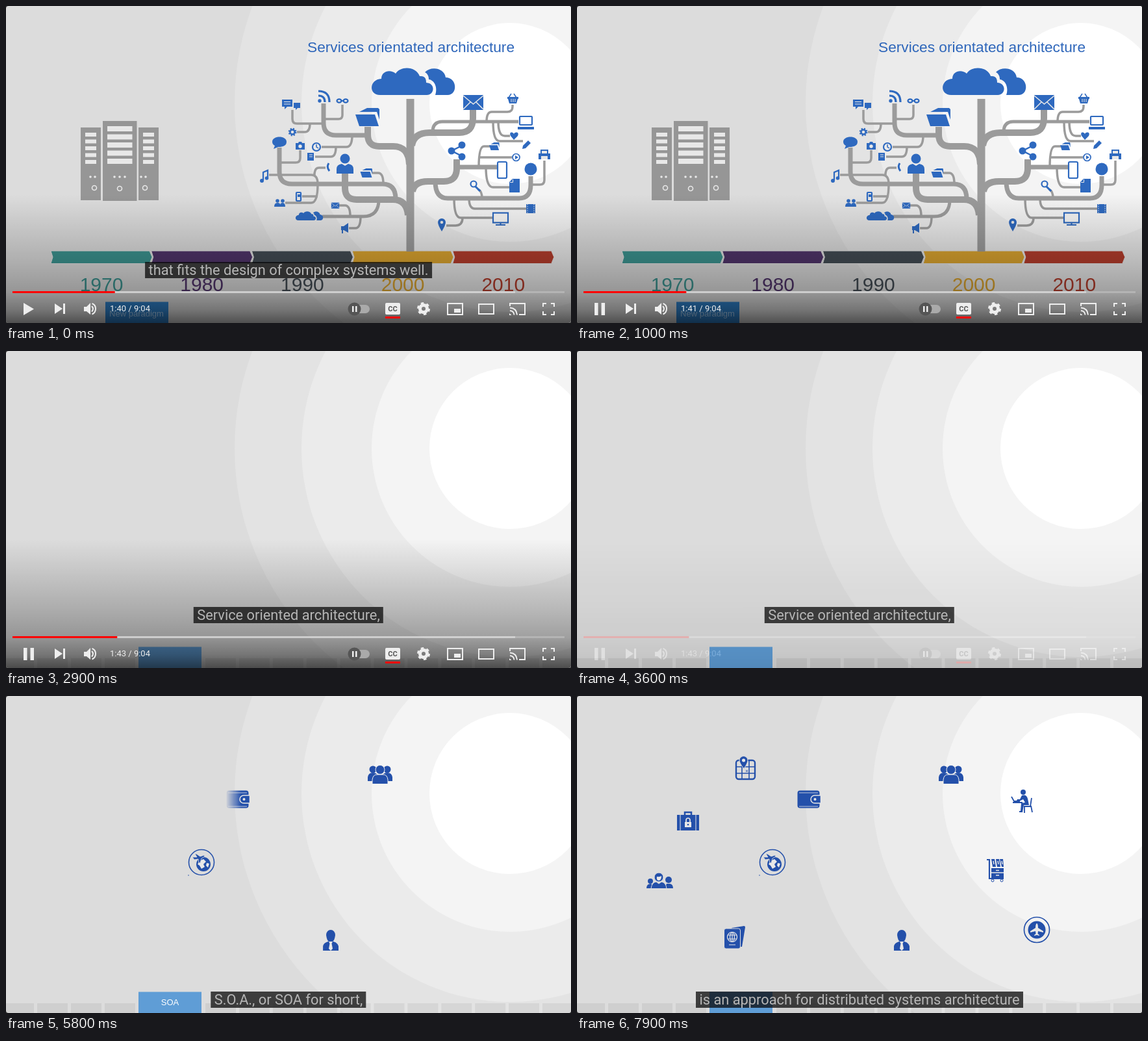
Recreate the animation shown at these times as an HTML page. Size 870 by 488 pixels, loop 8 s.

```html
<!DOCTYPE html>
<html lang="en">
<head>
<meta charset="utf-8">
<title>Services orientated architecture</title>
<style>
html, body { margin: 0; width: 100%; height: 100%; overflow: hidden; background: #333; }
#stage { position: relative; width: 870px; height: 488px; overflow: hidden; border-radius: 4px; background: #dcdcdc; }
#stage > svg { position: absolute; left: 0; top: 0; }
#stage > .icon {
  width: 48px; height: 48px; fill: #2450aa; stroke: none;
  mask-image: linear-gradient(to left, #000 calc(var(--p) * 150% - 50%), transparent calc(var(--p) * 150%));
}
.line { fill: none; stroke: #2450aa; }
.pale { fill: #e8e8e8; }
.paleline { fill: none; stroke: #e8e8e8; }
.sans { font-family: "Liberation Sans", Arial, sans-serif; }
#caption {
  position: absolute; left: 435px; transform: translateX(-50%); height: 25px; padding: 0 5.5px;
  font: 21.8px/25px Roboto, sans-serif; white-space: nowrap; color: #b6b6b6; background: rgba(8,8,8,.75);
}
</style>
</head>
<body>
<div id="stage">
<svg id="back" width="870" height="488">
  <circle cx="776" cy="150" r="424" fill="#e3e3e3"/>
  <circle cx="776" cy="150" r="321" fill="#ebebeb"/>
  <circle cx="776" cy="150" r="213" fill="#f4f4f4"/>
  <circle cx="776" cy="150" r="124" fill="#fff"/>

  <g id="scene">
    <text x="464" y="71" class="sans" font-size="22.7" fill="#2e66ba">Services orientated architecture</text>
    <g id="servers" fill="#969696"></g>
    <g id="years" class="sans" font-size="30" text-anchor="middle"></g>

    <g fill="none" stroke="#9b9b9b">
      <path stroke-width="12" d="M622.500 143V378"/>
      <path stroke-width="10" d="M557 186V198Q557 216 575 216H596Q620 216 621 244M522 258V280Q522 298 540 298H596Q617 298 619 322M719 160V173Q719 195 698 195H652Q628 195 625 215M694 236V250Q694 270 674 270H650Q628 270 626 286"/>
      <path stroke-width="7" d="M489 150V180Q489 199 508 199H556M421 218V255Q421 274 440 274H580Q600 274 600 297M694 248H756M808 262V275Q808 296 790 296H680Q661 296 661 270"/>
      <path stroke-width="5" d="M487 324H550Q574 324 574 298M789 178H672Q657 178 657 194"/>
      <path stroke-width="3.500" d="M441 160V174Q441 181 448 181H489M518 152V168Q518 174 512 174H489M448 194H460Q468 194 468 181
        M453 222V234Q453 241 446 241H421M486 217H524Q533 217 533 199M476 232H500Q508 232 508 217M492 249H482Q475 249 475 260
        M405 260H470Q480 260 480 274M564 257H573Q581 257 581 274M430 303H470Q480 303 480 274M456 293H480M513 307H522Q530 307 530 324
        M528 342H538Q546 342 546 324M780 152V155Q780 163 772 163H748Q740 163 740 178M776 200H768Q758 200 758 178
        M796 208H760Q750 208 750 178M745 216H736Q728 216 728 248M779 233H728M776 279H750Q739 279 739 248
        M829 238V268Q829 275 822 275H808M727 282Q733 285 733 296M801 312H722Q713 312 713 296M749 326H700Q690 326 690 296M678 338H692Q703 338 703 326"/>
    </g>

    <g fill="#2e69bf" stroke="none">
      <g id="clouds">
        <path d="M576 137C558 137 559 113 578 112C578 100 592 97 600 104C608 91 632 93 637 108C646 107 647 113 647 118C662 119 660 137 648 137Z"/>
        <path d="M645 102C654 92 675 95 677 110C695 110 696 137 680 137H661C665 126 660 114 651 113C651 108 649 104 645 102Z"/>
      </g>
      <use href="#clouds" transform="translate(467 323) scale(.33) translate(-627 -116)"/>
      <!-- folders -->
      <g id="folder"><path d="M544 163L556 157H573L575 159V175L571 163Z"/><path d="M538 167H568L574 185H544Z"/></g>
      <use href="#folder" transform="translate(555 257) scale(.5) translate(-557 -171)"/>
      <use href="#folder" transform="translate(752 216) scale(.42) translate(-557 -171)"/>
      <!-- envelopes -->
      <g id="mail"><path d="M704 137H735V160H704Z"/><path class="paleline" stroke-width="1.500" d="M704 138L719.500 151L735 138M704 159L715 148M735 159L724 148"/></g>
      <use href="#mail" transform="translate(507 307) scale(.4) translate(-719.500 -148)"/>
      <!-- chat, bubble, people -->
      <path d="M425 144H441V155H433L429 159V155H425ZM443 149H453V157H449L446 160V157H443Z"/>
      <path class="paleline" d="M428 147.500H438M428 151H438"/>
      <path d="M410 209C410 199 432 199 432 209C432 217 422 217 419 217L412 220L414 215Q410 213 410 209Z"/>
      <circle cx="522" cy="235" r="7.500"/><path d="M509 258V251Q509 244 517 243L522 246L527 243Q535 244 535 251V258Z"/>
      <circle cx="418" cy="300" r="2.800"/><circle cx="426" cy="300" r="2.800"/><path d="M413 309Q413 303 418 303T422 307Q422 303 426 303T430 309Z"/>
      <!-- feed and link -->
      <circle cx="483" cy="146" r="2.700"/>
      <path fill="none" stroke="#2e69bf" stroke-width="3.200" d="M481 138Q491 138 491 148M481 131Q498 131 498 148"/>
      <g fill="none" stroke="#2e69bf" stroke-width="2.200">
        <ellipse cx="513" cy="146" rx="3.500" ry="2.600"/><ellipse cx="523" cy="146" rx="3.500" ry="2.600"/><path d="M515 146H521"/>
        <circle cx="441" cy="194" r="3.600" stroke-width="2.500"/><circle cx="441" cy="194" r="5.300" stroke-dasharray="2.100"/>
        <circle cx="478" cy="217" r="6"/><path d="M478 213V217L481 219" stroke-width="1.500"/>
        <circle cx="785.500" cy="233" r="5.500" stroke-width="1.700"/>
        <circle cx="720" cy="274" r="4.500"/><path stroke-width="3" d="M723 278L730 285M497 242Q493 248 498 254"/>
        <path d="M396 268V256L403 253V264"/>
        <path stroke-width="2.500" d="M702 215L686 223L702 231"/>
        <path d="M774 141L778 135M786 141L782 135" stroke-width="1.500"/>
        <rect x="791" y="170" width="19" height="13" rx="1"/><path d="M788 188H813" stroke-width="4"/>
        <rect x="750" y="318.500" width="23" height="15"/><path d="M754 337H769M761.500 333V337"/>
        <rect x="757" y="240" width="14" height="25" rx="2"/>
        <rect x="447" y="287" width="7" height="13" rx="1"/>
      </g>
      <path d="M784 230L789 233L784 236ZM449 290H453V294H449Z"/>
      <circle cx="394" cy="269" r="3"/><circle cx="401.500" cy="265" r="2.800"/>
      <circle cx="702" cy="214" r="5.500"/><circle cx="686" cy="223" r="5.500"/><circle cx="702" cy="232" r="5.500"/>
      <path d="M446 211H450L451 209H455L456 211H460V221H446Z"/><circle class="pale" cx="453" cy="216" r="2.700"/>
      <path d="M464 226H474V238H464Z"/><path class="paleline" d="M467 229H472M467 232H472"/>
      <path d="M772 140H789V143H788L786 150H775L773 143H772Z"/><path class="paleline" d="M778 143V148M781 143V148M784 143V148"/>
      <path d="M782 206L777 200C774 194 780 193 782 197C784 193 791 194 788 200Z"/>
      <path d="M795 220L796 215L804 207L808 211L800 219Z"/>
      <path d="M823 221H835V227H838V236H820V227H823Z"/><path class="pale" d="M825 223H833V227H825ZM824 231H834V236H824Z"/>
      <path d="M780 266H791V287H775V271Z"/><path class="paleline" d="M776 271.500H780.500V267"/>
      <path d="M801 305H815V319H801Z"/><path class="paleline" stroke-dasharray="1.500" d="M803 305V319M813 305V319"/>
      <path d="M671 347Q665 337 665 333A6 6 0 0 1 677 333Q677 337 671 347Z"/><circle class="pale" cx="671" cy="333" r="2.300"/>
      <path d="M516 339H520L527 334V349L520 345H519V350H517V345H516Z"/>
      <circle cx="808" cy="251" r="9.500"/>
    </g>
  </g>

  <g id="switcher">
    <rect x="71" y="140" width="840" height="200" rx="16" fill="#999"/>
    <rect x="172" y="176" width="141" height="110" rx="8" fill="#666"/>
    <rect x="228" y="204" width="62" height="56" fill="#4a86e0"/>
    <circle cx="390" cy="235" r="38" fill="#e0c080"/>
    <rect x="612" y="190" width="88" height="88" rx="18" fill="#ccc"/>
    <text x="390" y="319" class="sans" font-size="16" fill="#fff" text-anchor="middle">Web Navigator</text>
  </g>

  <g id="tiles" fill="#000" fill-opacity=".06"></g>
  <g id="chapter" class="sans" font-size="13" text-anchor="middle">
    <rect y="455.500" width="97" height="33"/>
    <text id="oldName" x="48" y="478" fill="#b4d6f5">New paradigm</text>
    <text id="newName" x="48.500" y="476" fill="#fff">SOA</text>
  </g>

  <g id="controls" fill="#eee">
    <linearGradient id="shade" gradientUnits="userSpaceOnUse" x1="0" x2="0" y1="290" y2="488">
      <stop offset="0" stop-opacity="0"/><stop offset=".25" stop-opacity=".1"/><stop offset=".55" stop-opacity=".22"/>
      <stop offset=".76" stop-opacity=".32"/><stop offset=".9" stop-opacity=".47"/><stop offset="1" stop-opacity=".64"/>
    </linearGradient>
    <path fill="url(#shade)" d="M0 290H870V488H0Z"/>
    <path fill-opacity=".25" d="M10 439H860V442H10Z"/><path fill-opacity=".5" d="M10 439H784V442H10Z"/>
    <rect id="played" x="10" y="439" height="3" fill="#f00"/>
    <path id="play" d="M27 457V476L43 466.500Z"/>
    <path id="pause" d="M27 457H32.500V476H27ZM37.500 457H43V476H37.500Z"/>
    <path d="M75 458V474L87 466ZM88 458H91V474H88Z"/>
    <path d="M120 463H124L130 457V475L124 470H120Z"/>
    <path fill="none" stroke="#eee" stroke-width="2" d="M132 462Q136 466 132 470.500M132.500 458Q138 460 138 466T132.500 474.500"/>
    <text id="clock" x="160" y="470" font-family="Roboto, sans-serif" font-size="13"></text>
    <rect x="533" y="460" width="27" height="13" rx="6.500" fill="#aaa"/>
    <circle cx="536.500" cy="466.500" r="10" fill="#555"/><path d="M533 462H535.500V471H533ZM538 462H540.500V471H538Z"/>
    <rect x="584" y="457" width="23" height="18" rx="2"/>
    <text x="595.500" y="470" font-family="Roboto, sans-serif" font-weight="bold" font-size="11" text-anchor="middle" fill="#555">CC</text>
    <path fill="#f00" d="M584 478H607V481H584Z"/>
    <g fill="none" stroke="#eee" stroke-width="2">
      <circle cx="643" cy="466" r="5.500" stroke-width="5"/><circle cx="643" cy="466" r="8.500" stroke-width="3" stroke-dasharray="4.450"/>
      <rect x="680" y="458" width="23" height="17"/><rect x="728" y="459" width="23" height="15"/>
      <path d="M776 462V458H799V475H790M776 464.500Q786 465 787 475.500M776 469Q782 469.500 782.500 475.500M827 463V458H832M839 458H844V463M844 470V475H839M832 475H827V470"/>
    </g>
    <path d="M690 466H700V472H690ZM775 473L778.500 476H775Z"/>
  </g>
</svg>
<div id="caption"></div>
</div>
<script>
const $ = id => document.getElementById(id);
const LOOP = 8000, STEP = 100;

// Servers: x, y, width, height, slot height, indicator x, button y
$('servers').innerHTML = [
  [115, 187, 31, 112, 6, 136, 280], [204, 187, 31, 112, 6, 214, 280], [149, 177, 52.5, 123, 8, 175, 281]
].map(([x, y, w, h, slot, cx, cy]) => {
  const dots = (w > 40 ? [-8, 0, 8] : [-6, 1]).map(d => `<circle class="pale" cx="${cx + d}" cy="263" r="1.800"/>`);
  const slots = [0, 1, 2, 3, 4].map(i =>
    `<rect class="pale" x="${x + 7}" y="${y + 8 + i * (slot + 4.5)}" width="${w - 14}" height="${slot}"/>`);
  return `<rect x="${x}" y="${y}" width="${w}" height="${h}"/>${slots.join('')}${dots.join('')}
    <circle class="paleline" stroke-width="1.600" cx="${cx}" cy="${cy}" r="3.500"/>`;
}).join('');

$('years').innerHTML = ['#3c9490', '#50346a', '#434c54', '#dba42f', '#b53d2c'].map((color, i) => {
  const x = 69 + i * 154.7;
  return `<path fill="${color}" stroke="#e4e4e4" d="M${x} 377H${x + 152}l4 9.500l-4 10H${x}l3 -10Z"/>
    <text x="${x + 78}" y="439" fill="${color}">${1970 + i * 10}</text>`;
}).join('');

$('tiles').innerHTML = Array.from({ length: 15 }, (_, i) =>
  `<rect x="${i < 4 ? i * 52 - 4 : 307 + (i - 4) * 51.9}" y="473" width="47" height="15"/>`).join('');

// Service icons: centre, reveal start, drawing around the centre
const icons = [
  [576, 121, 5200, `<circle cx="-11" cy="-8" r="5.500"/><circle cx="11" cy="-8" r="5.500"/><path d="M-19 10V4Q-18-3-11-3T0 6Q4-3 11-3T19 4V10Z"/>
    <g stroke="#eee"><circle cy="-7.500" r="7"/><path d="M-12 14.500V8Q-11 0-5 0H5Q11 0 12 8V14.500Z"/></g>`],
  [301, 256, 5300, `<circle class="line" r="19.500" stroke-width="1.600"/><circle cx="3" cy="3" r="11"/>
    <path class="pale" d="M-3-2L3-5L7-1L3 3L5 7L0 10L-3 5L-6 3ZM8 1L12 2L10 8L7 5Z"/>
    <path stroke="#e2e2e2" stroke-width=".8" d="M-14-8L-7-8L-10-13H-8L-2-9L4-11L5-9L0-6L-2 1H-4L-5-5L-11-4Z"/><circle cx="-20" cy="20" r=".8"/>`],
  [500, 376, 5400, `<path d="M-7-8A7 8 0 0 1 7-8Q6 0 3 2H-3Q-6 0-7-8ZM-12 16V9Q-11 4-4 2H4Q11 4 12 9V16Z"/><path class="pale" d="M-3 2H3L1.500 5L3 13L0 16L-3 13L-1.500 5Z"/>`],
  [357, 159, 5500, `<rect x="-17.500" y="-13.500" width="34" height="27" rx="4"/><path class="paleline" d="M-15-10H14M-15 11H14" stroke-width=".8"/>
    <path stroke="#e5e5e5" stroke-width="1.500" d="M18.500-6H9A6 6 0 0 0 9 6H18.500Z"/><circle class="pale" cx="9.500" r="2"/>`],
  [645, 268, 5750, `<path class="line" stroke-width="2.200" d="M-14-16H-10V13H12"/><path d="M-7-17H-2L0-5H-5ZM0-17H5L7-5H2ZM6-17H11L12-5H9ZM-7-3H12V12H-7Z"/>
    <path class="paleline" stroke-width="1.500" d="M-7 4H12M0 .5H5M0 8H5M-4-14L-3-9M3-14L4-9M9-14L10-9"/><circle class="line" cx="-5" cy="16" r="2"/><circle class="line" cx="9" cy="16" r="2"/>`],
  [259, 111, 5900, `<rect class="line" x="-14" y="-12" width="29" height="29" rx="4" stroke-width="2.400"/>
    <path class="line" stroke-width="1.600" d="M-5-12V17M6-12V17M-14-2H15M-14 8H15"/>
    <path stroke="#dedede" d="M-2 1Q-9-8-9-12A6.500 6.500 0 0 1 4-12Q4-8-2 1Z"/><circle class="pale" cx="-2.500" cy="-12" r="2.600"/><path class="line" d="M1 3L4 6M4 3L1 6"/>`],
  [708, 360, 6000, `<circle class="line" r="19.500" stroke-width="1.700"/><circle r="13.500"/><path class="pale" d="M0-10Q2-9 2-3L10 2V4L2 2L1.500 6L4 8V9L0 8L-4 9V8L-1.500 6L-2 2L-10 4V2L-2-3Q-2-9 0-10Z"/>`],
  [243, 371, 6050, `<path d="M-5-14L14-17Q16-17 16-15L11 15H8Z"/><rect x="-16.500" y="-13" width="25" height="31" rx="3" stroke="#dedede"/>
    <g class="paleline" stroke-width="1.200"><circle cx="-4" r="7.500"/><ellipse cx="-4" rx="3.500" ry="7.500"/><path d="M-11-3H3M-11 3H3M-4-7V7M-9 12H1"/></g>`],
  [686, 162, 6100, `<circle cx="1" cy="-14" r="4"/><path d="M-1-9Q6-11 8-4L10 6H2L0 17H-5V15H-3L-2 3L4 2L1-3L-5 0L-9-1L-8-3L-4-3Z"/>
    <path class="line" stroke-width="1.800" d="M-17-7L-13 0H-4M-15 2H0M14-5L12 8H2M3 8V18M13 7L15 17"/>`],
  [171, 192, 6150, `<path class="line" stroke-width="2.500" d="M-5-9V-13H5V-9"/><path d="M-17-9H17V15H-17Z"/><path class="paleline" d="M-12-9V15M12-9V15"/>
    <path class="pale" d="M-5 2H5V10H-5Z"/><path class="paleline" stroke-width="1.700" d="M-3 2V-1Q-3-4 0-4T3-1V2"/><circle cy="6" r="1.300"/>`],
  [128, 285, 6400, `<circle cx="-15" cy="0" r="4"/><circle cx="13" cy="-2" r="5"/><path d="M-21 11Q-21 4-14 4L-8 11ZM7 11L10 4H15Q20 5 20 11Z"/>
    <g stroke="#dedede"><circle cx="-2" cy="-6" r="7"/><path d="M-14 11.500Q-13 2-6 1L-2 4L2 1Q9 2 10 11.500Z"/></g><path class="pale" d="M-5-7Q-1-6 2-8Q2-1-2-1T-5-7Z"/>`]
].map(([x, y, start, art]) => {
  $('back').insertAdjacentHTML('afterend', `<svg class="icon" viewBox="-24 -24 48 48" style="left:${x - 24}px;top:${y - 24}px">${art}</svg>`);
  return { el: $('back').nextElementSibling, start };
});

// Caption: start time, top, text
const captions = [
  [0, 394, 'that fits the design of complex systems well.'],
  [1000, 394, ''],
  [2500, 394, 'Service oriented architecture,'],
  [3700, 455, 'Service oriented architecture,'],
  [4000, 455, 'S.O.A., or SOA for short,'],
  [7400, 455, 'is an approach for distributed systems architecture']
];

const show = (id, opacity) => { $(id).style.opacity = opacity; };

function draw(t) {
  const ramp = (from, to) => Math.min(1, Math.max(0, (t - from) / (to - from)));
  show('scene', 1 - ramp(1500, 2300));
  show('switcher', t < 100 ? 0 : 0.45 * (1 - ramp(100, 400)) ** 2);

  const p = ramp(1600, 2800);
  const slide = p < .5 ? 4 * p ** 3 : 1 - 4 * (1 - p) ** 3;
  $('chapter').setAttribute('transform', `translate(${153 + 51 * slide})`);
  $('chapter').style.fill = `color-mix(in srgb, #5f9dd6 ${slide * 100}%, #2f82cc)`;
  show('tiles', slide);
  show('oldName', 0.9 * (1 - ramp(1600, 2500)));
  show('newName', ramp(4200, 4500));

  const seconds = 100.9 + Math.max(0, t - 600) / 1000;
  const whole = Math.floor(seconds);
  $('played').setAttribute('width', seconds * 850 / 544);
  $('clock').textContent = `${Math.floor(whole / 60)}:${String(whole % 60).padStart(2, '0')} / 9:04`;
  show('play', t < 600 ? 1 : 0);
  show('pause', t < 600 ? 0 : 1);
  show('controls', 1 - ramp(3200, 3700));

  const [, top, text] = captions.findLast(c => c[0] <= t);
  $('caption').style.top = top + 'px';
  $('caption').textContent = text;
  $('caption').hidden = !text;

  for (const { el, start } of icons) el.style.setProperty('--p', ramp(start, start + 500));
}

const begin = performance.now();
function tick() {
  const t = (performance.now() - begin) % LOOP;
  draw(Math.floor(t / STEP) * STEP);
  requestAnimationFrame(tick);
}
tick();
</script>
</body>
</html>
```
